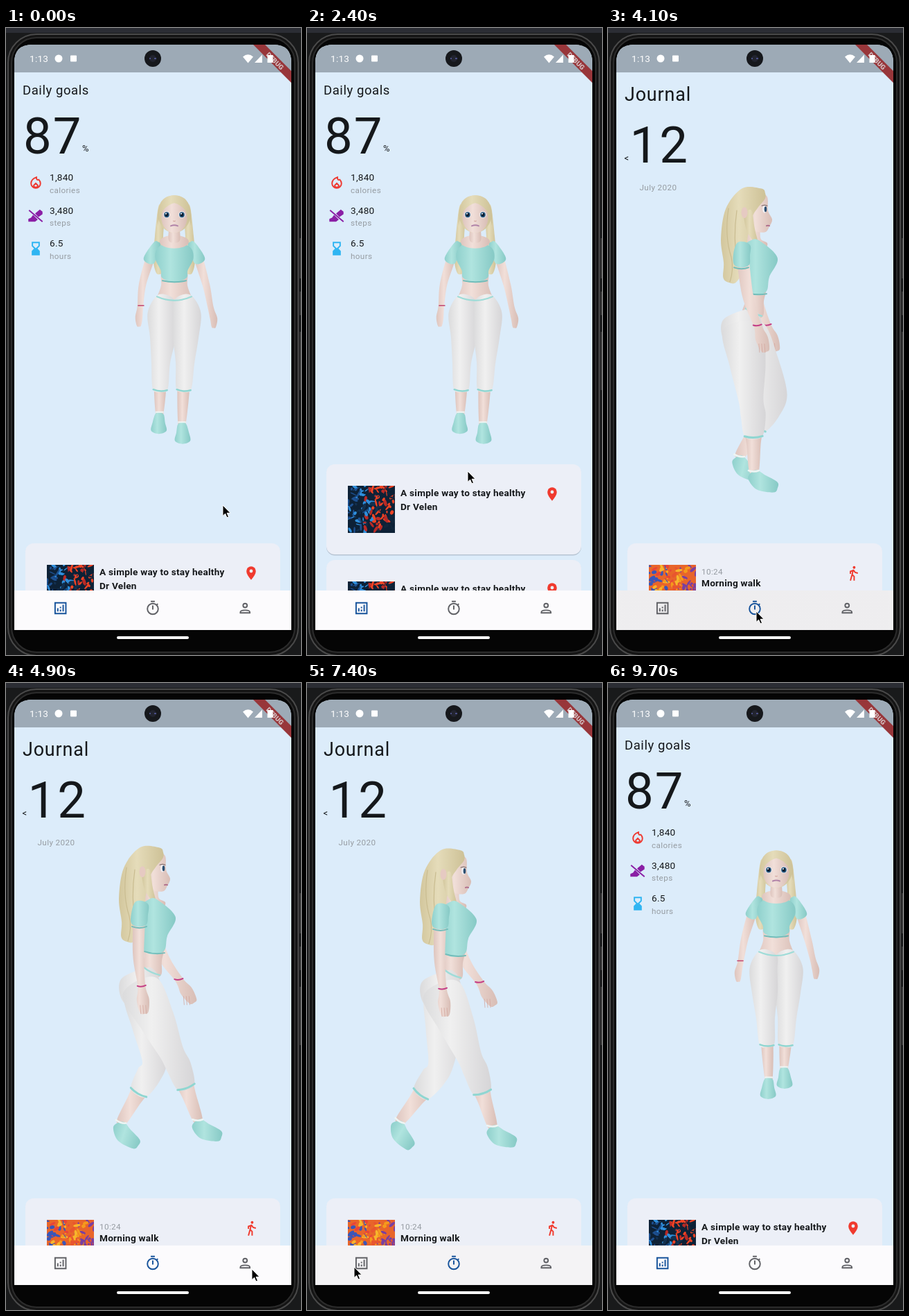
Recreate the animation shown at these times as an HTML page. Size 426 by 904 pixels, loop 9.8 s.

```html
<!DOCTYPE html>
<html lang="en">
<head>
<meta charset="utf-8">
<style>
html, body { margin: 0; width: 100%; height: 100%; overflow: hidden; background: #222429; }
svg { display: block; width: 100%; height: 100%; font-family: Roboto, sans-serif; fill: #15181b; }
.body { font-size: 13.62px; letter-spacing: .243px; }
.small { font-size: 11.68px; letter-spacing: .39px; fill: #969ca2; }
.bold { font-weight: 700; }
.unit { font-size: 13px; letter-spacing: .4px; }
.huge { font-size: 72.5px; letter-spacing: 2px; }
</style>
</head>
<body>
<svg id="stage" viewBox="0 0 426 904"></svg>
<script>
const TAU = Math.PI * 2, LOOP = 9800, STEP = 1200;
const $ = id => document.getElementById(id);
const clamp = v => Math.max(0, Math.min(1, v));
const ease = v => (v = clamp(v), v * v * (3 - 2 * v));
const mix = (a, b, k) => a + (b - a) * k;
const bothSides = draw => draw(-1) + draw(1);

// Icons on a 24 unit grid; paths are stroked unless they carry a fill.
const circle = (x, y, r, extra = '') => `<circle cx="${x}" cy="${y}" r="${r}" ${extra}/>`;
const path = (d, extra = '') => `<path d="${d}" ${extra}/>`;
const SOLID = 'fill="currentColor" stroke="none"';
const ICONS = {
  stats: path('M4 4h16v16H4zM8 12v5M12 10v2M12 14v3M16 7v10'),
  timer: circle(12, 13, 8) + path('M9 2h6M12 8v6M17.500 7.500l2-2'),
  person: circle(12, 8, 3) + path('M5 19v-1c0-4 14-4 14 0v1z'),
  pin: path('M12 22Q5 14 5 9a7 7 0 0 1 14 0Q19 14 12 22z', SOLID) + circle(12, 9, 2.5, 'fill="#eceff7" stroke="none"'),
  walk: circle(13.5, 3.5, 2, SOLID) + path('M8 13V9.500L12 8l-1.500 6 3 3v6M10.500 14L8 23M13 8l2 3 4 1'),
  fire: path('M13 4Q5 7 5 13a7 7 0 0 0 14 0q0-3-2.500-5.500Q13 9 13 4zM12 13l-3 3a3 3 0 0 0 6 0z'),
  shoe: path('M1 17v4h10l4-3-7-7-3 4zM11 9l5 5 6-4V6l-4-3z', SOLID) + path('M2 4l20 17'),
  glass: path('M7 3h10v5l-4 4 4 4v5H7v-5l4-4-4-4z') + path('M7 21v-5l5-4 5 4v5z', SOLID)
};
const icon = (name, x, y, color, id = name) =>
  `<g id="${id}" color="${color}" fill="none" stroke="currentColor" stroke-width="2" transform="translate(${x - 11.7} ${y - 11.7}) scale(.973)">${ICONS[name]}</g>`;
const text = (s, x, y, cls, extra = '') => `<text x="${x}" y="${y}" class="${cls}" ${extra}>${s}</text>`;
// Headings scale to one width, hanging from the same top edge.
const heading = (s, size) => text(s, 24, 76 + size * 1.09, '', `font-size="${size}" letter-spacing="${size / 32}"`);

// Abstract paint picture: colours run from left to right with some scatter.
function paint(base, colors, seed) {
  const rnd = () => (seed = seed * 16807 % 2147483647) / 2147483647;
  let out = `<rect width="68" height="68" fill="${base}"/>`;
  for (let i = 0; i < 150; i++) {
    const x = rnd() * 68, y = rnd() * 68, k = clamp(x / 68 + (rnd() - .5) * .5) * .999;
    out += `<ellipse cx="${x}" cy="${y}" rx="${1 + rnd() * 5}" ry="${.6 + rnd() * 2}" fill="${colors[k * colors.length | 0]}" transform="rotate(${rnd() * 180} ${x} ${y})"/>`;
  }
  return out;
}
const card = (y, photo, mark, lines) => `<g transform="translate(0 ${y})">
  <rect x="28" y="1.5" width="368" height="130" rx="12" fill="#9aa5b3" opacity=".55"/>
  <rect x="28" width="368" height="130" rx="12" fill="#eceff7"/>
  <g transform="translate(59 31)" clip-path="url(#photoClip)">${photo}</g>
  ${lines}${icon(mark, 354, 43, '#f03a2e')}</g>`;
const article = y => card(y, paint('#0d2136', ['#1d4f8f', '#2f8fdc', '#12304f', '#b92a26', '#ef4425', '#10263c'], 71), 'pin',
  text('A simple way to stay healthy', 135, 46, 'body bold') + text('Dr Velen', 135, 65.5, 'body bold'));
const stat = (row, name, color, value, label) => `<g transform="translate(0 ${215 + row * 47.5})">` +
  icon(name, 43, 8, color) + text(value, 63, 5, 'body') + text(label, 63, 22.5, 'small') + '</g>';
const gradient = (id, edge, mid, dark) => `<linearGradient id="${id}">
  <stop stop-color="${edge}"/><stop offset=".4" stop-color="${mid}"/><stop offset="1" stop-color="${dark}"/></linearGradient>`;
const bezel = (inset, radius, fill, stroke) => `<rect x="${inset}" y="${inset + 6}" width="${425 - 2 * inset}"
  height="${902 - 2 * inset}" rx="${radius}" fill="${fill}" stroke="${stroke}" stroke-width="2"/>`;

$('stage').innerHTML = `<defs>
  ${gradient('skin', '#dec5be', '#f1dfd9', '#d8bdb5')}
  ${gradient('teal', '#8fd0cc', '#b0e4df', '#86c9c5')}
  ${gradient('pants', '#dbdbdc', '#f0f0f0', '#d6d5d7')}
  ${gradient('hair', '#d2c69c', '#e5dcba', '#cdc196')}
  <radialGradient id="ink"><stop offset=".6"/><stop offset="1" stop-opacity="0"/></radialGradient>
  <clipPath id="screen"><path d="M12 868V50Q12 24 38 24H386Q412 24 412 50V868Z"/></clipPath>
  <clipPath id="above"><rect x="12" y="64" width="400" height="747"/></clipPath>
  <clipPath id="navClip"><rect x="12" y="811" width="400" height="57"/></clipPath>
  <clipPath id="photoClip"><rect width="68" height="68"/></clipPath>
  <clipPath id="round">${circle(212, 438, 180)}</clipPath>
</defs>
<rect width="426" height="904" fill="#191a1b"/>
<rect width="426" height="7" fill="#2b2d34"/>
<path d="M424 303h2v58h-2zM424 380h2v34h-2zM424 438h2v84h-2z" fill="#3b3b3b"/>
${bezel(3, 41, '#141414', '#4a4a4a')}${bezel(8, 36, '#050505', '#2c2c2c')}
<g clip-path="url(#screen)">
  <rect id="back" x="12" y="24" width="400" height="844"/>
  <g clip-path="url(#above)">
    <g id="home">${heading('Daily goals', 18.5)}
      ${text('87', 25, 181, 'huge')}${text('%', 110, 178, 'unit')}
      ${stat(0, 'fire', '#ee3a32', '1,840', 'calories')}
      ${stat(1, 'shoe', '#8a1fa5', '3,480', 'steps')}
      ${stat(2, 'glass', '#2fb5f2', '6.5', 'hours')}</g>
    <g id="journal">${heading('Journal', 26.9)}
      ${text('&lt;', 23.5, 192, 'unit')}${text('12', 31.5, 194, 'huge')}${text('July 2020', 45.5, 233.5, 'small')}
      ${card(743, paint('#e8652a', ['#3a56b8', '#e8443a', '#f7b52c', '#f59a1d', '#e8562f', '#7a3fa0'], 23), 'walk',
        text('10:24', 135, 44.5, 'small') + text('Morning walk', 135, 62, 'body bold'))}</g>
    <g id="profile">${heading('Profile', 30.8)}
      ${text('Vio', 24, 190, '', 'font-size="62.3" letter-spacing="2"')}${text('23 years old', 39.5, 226, 'small')}
      ${circle(212, 438, 180, 'fill="#dcecfa"')}</g>
    <g id="frame"><g id="figure"></g></g>
    <g id="list">${article(743)}${article(881)}</g>
  </g>
  <rect x="12" y="24" width="400" height="40" fill="#9daab6"/>
  <path d="M357 24H374L412 62V79Z" fill="#98363a"/>
  <text transform="translate(388.5 47.5) rotate(45)" y="3.5" text-anchor="middle" font-size="9.7" font-weight="900" fill="#d3bfc1">DEBUG</text>
  <g fill="#fff">${text('1:13', 34, 49, 'body', 'fill="#fff"')}
    ${circle(76, 44, 5.5)}<rect x="93" y="39.500" width="9" height="9" rx="1"/>
    <path d="M342 41.500Q349.500 35 357 41.500L349.500 50.500ZM359 50H370V38.500ZM377.500 39h8v11h-8z"/></g>
  <rect x="12" y="811" width="400" height="57" fill="#fcfbfd"/>
  <circle id="ripple" cy="840" fill="url(#ink)" clip-path="url(#navClip)"/>
  ${['stats', 'timer', 'person'].map((name, i) => icon(name, 78.7 + i * 133.3, 836.5, '', 'nav' + i)).join('')}
</g>
${circle(212, 44, 12, 'fill="#16181c"')}${circle(212, 44, 5, 'fill="#22242f"')}
<path d="M207 44h2M214 44h3" stroke="#4a4f86" stroke-width="2"/>
<rect x="160" y="877" width="104" height="4" rx="2" fill="#fff"/>
<path id="cursor" d="M0 0V15.500L3.600 12.200 6 17.800 8.500 16.700 6.100 11.300H11Z" fill="#000" stroke="#fff"/>`;

// Smooth closed outline through the points.
function blob(fill, p) {
  const n = p.length, at = i => p[(i + n) % n];
  const control = (i, s) => [0, 1].map(k => (at(i)[k] + s * (at(i + 1)[k] - at(i - 1)[k]) / 6).toFixed(1));
  return path(`M${p[0]}` + p.map((_, i) => `C${control(i, 1)} ${control(i + 1, -1)} ${at(i + 1)}`).join('') + 'Z', `fill="url(#${fill})"`);
}
// Tapered limb along [x, y, radius] joints.
function limb(fill, ...p) {
  const off = (i, along, across) => {
    const a = p[i - 1] || p[i], b = p[i + 1] || p[i], l = Math.hypot(b[0] - a[0], b[1] - a[1]);
    const u = (b[0] - a[0]) / l, v = (b[1] - a[1]) / l, [x, y, r] = p[i];
    return [x + r * (along * u - across * v), y + r * (along * v + across * u)];
  };
  return blob(fill, [...p.map((_, i) => off(i, 0, 1)), off(p.length - 1, .4, 0),
    ...p.map((_, i) => off(i, 0, -1)).reverse(), off(0, -.4, 0)]);
}
const oval = (x, y, rx, ry, fill) => `<ellipse cx="${x}" cy="${y}" rx="${rx}" ry="${ry}" fill="${fill}"/>`;
const line = (d, color, w) => path(d, `fill="none" stroke="${color}" stroke-width="${w}" stroke-linecap="round"`);
const shift = (y, s) => `<g transform="translate(0 ${y.toFixed(2)})">${s}</g>`;
const bob = ph => 5 * Math.cos(2 * TAU * (ph - .05));

function frontLeg(side, depth, footX, b) {
  const x = 243 + side * 18.5, y = 594 + 15 * depth, cx = mix(x, footX, .65), cy = 520 + b * .6;
  return limb('skin', [cx, cy - 8, 8.5], [footX, y - 30, 5.5]) +
    limb('teal', [footX, y - 30, 6], [footX + side, y - 18, 9], [footX + side, y - 6, 11]) +
    line(`M${footX - 5} ${y - 33}h10`, '#eef5f4', 2) +
    limb('pants', [243 + side * 12, 390 + b, 14], [x, 412 + b, 20], [x - side * 2, 446 + b, 18.5], [mix(x, cx, .6), 483, 13.5], [cx, cy, 10.8]) +
    line(`M${cx - 10} ${cy + 1}q10 4 20 1`, '#8fd6d1', 2.5);
}
function frontArm(side, handX, handY) {
  const at = (out, y, r) => [243 + side * out, y, r];
  return limb('skin', at(35, 332, 6), at(46, 370, 5.2), [mix(243 + side * 46, handX, .6), handY - 28, 4.2], [handX, handY - 12, 5.2], [handX, handY, 3]) +
    limb('teal', at(24, 310, 5), at(32, 325, 8), at(37, 336, 8));
}
const eye = x => oval(x, 269, 5, 5, '#efedf0') + oval(x, 269, 3.8, 4, '#28587f') + oval(x, 269, 2.2, 2.4, '#0b1a2b') + oval(x - 1, 267.5, 1, 1, '#fff');

function front(ph) {
  const c = Math.cos(TAU * ph), s = Math.sin(TAU * ph), b = bob(ph);
  const legs = [frontLeg(-1, c, 227 + 6 * s, b), frontLeg(1, -c, 254, b)];
  if (c > 0) legs.reverse();
  const lock = k => limb('hair', [243 + k * 18, 258, 5], [243 + k * 22, 300, 6], [243 + k * 23, 335, 7], [243 + k * 20, 352, 6]);
  const behind = bothSides(lock) + frontArm(-1, 190 - 4 * c, 429) + frontArm(1, 300, 428 - 6 * c) +
    line(`M${189 - 4 * c} 400h8`, '#c0436f', 1.6) +
    limb('skin', [243, 350, 18], [243, 371, 19], [243, 388, 25], [243, 396, 27]);
  const body = line('M218 387q25 11 50 0', '#9fdcd8', 2.2) +
    limb('teal', [243, 316, 23], [243, 332, 27.5], [243, 349, 19.5], [243, 360, 17.5]) +
    oval(243, 308, 21, 9.5, 'url(#skin)') + limb('skin', [243, 288, 7], [243, 306, 8]) +
    line('M226 364q17 4 34 0', '#72bdba', 2) +
    oval(243, 268, 23.5, 27, 'url(#hair)') + oval(243, 273, 18.5, 22, 'url(#skin)') +
    path('M219 285Q215 241 243 241Q271 241 267 285Q264 258 243 252Q222 258 219 285Z', 'fill="url(#hair)"') +
    bothSides(k => eye(243 + k * 11)) + line('M241.500 278q1.500 1 3 0', '#cf9f96', 1) + line('M238 285q5 -2 10 0', '#b183a8', 2);
  return shift(b, behind) + legs.join('') + shift(b, body);
}

// Stance slides back in a straight line, swing returns with a lift.
function sideLeg(ph, hipX, hipY) {
  ph -= Math.floor(ph);
  const u = clamp((ph - .6) / .4);
  const x = ph < .6 ? 285 - 268 * ph : mix(124, 285, (1 - Math.cos(Math.PI * u)) / 2);
  const y = 639 - 7 * ease((ph - .3) / .2) * (1 - u) - 18 * Math.sin(Math.PI * u);
  const turn = 30 * ease((ph - .3) / .25) * (1 - ease(u / .8));
  const dx = x - hipX, dy = y - hipY, d = Math.hypot(dx, dy);
  const bend = Math.sqrt(Math.max(50, 102 * 102 - d * d / 4));
  const kx = hipX + dx / 2 + dy / d * bend, ky = hipY + dy / 2 - dx / d * bend;
  const on = (k, r) => [mix(kx, x, k), mix(ky, y, k), r];
  const [cx, cy] = on(.5), a = Math.atan2(y - ky, x - kx) * 360 / TAU - 90;
  return limb('skin', on(.4, 12), on(.65, 10), on(1, 7)) +
    `<g transform="translate(${x} ${y}) rotate(${turn})">` +
    limb('teal', [-2, 5, 9], [10, 16, 12], [31, 23, 8]) + line('M-8 -1q8 3 15 0', '#eef5f4', 2.5) + '</g>' +
    limb('pants', [hipX, hipY, 29], [mix(hipX, kx, .5), mix(hipY, ky, .5), 26], [kx - 3, ky, 18], on(.22, 18), on(.5, 13.5)) +
    `<g transform="translate(${cx} ${cy}) rotate(${a})">${line('M-13 1q13 4 26 0', '#8fd6d1', 3)}</g>`;
}
function sideArm(x, y, deg, bend) {
  const step = ([px, py], len, a) => [px + len * Math.sin(a * TAU / 360), py + len * Math.cos(a * TAU / 360)];
  const e = step([x, y], 68, deg), w = step(e, 46, deg + bend), h = step(w, 20, deg + bend), tip = step(h, 18, deg + bend);
  return limb('skin', [x, y, 8], [...e, 8], [...w, 5.5], [...h, 9], [...tip, 6]) +
    line(`M${w[0] - 6} ${w[1]}q6 2 12 -1`, '#c43d86', 2) +
    [-4, 0, 4].map(k => line(`M${h[0] + k} ${h[1] + 8}l1 12`, '#d3a89f', .8)).join('');
}
function sideView(ph) {
  const c = Math.cos(TAU * ph), b = bob(ph);
  const waist = limb('skin', [214, 378, 14], [212, 398, 13], [209, 418, 15]) +
    limb('pants', [211, 416, 11], [196, 437, 32], [196, 458, 27]) + line('M199 409q10 8 23 11', '#9fdcd8', 2.5);
  const head = limb('skin', [211, 288, 8], [209, 312, 12], [222, 324, 12]) +
    blob('skin', [[200, 250], [228, 246], [231, 268], [237, 281], [233, 291], [227, 299], [212, 297], [198, 282]]) +
    limb('hair', [224, 244, 8], [205, 250, 18], [189, 272, 20], [182, 310, 19], [183, 345, 16], [176, 368, 10]) +
    limb('hair', [202, 270, 6], [206, 295, 6], [215, 315, 2]) +
    line('M174 265q-6 40 4 70q4 18 -2 36M186 268q-6 40 1 80', '#c9bc90', 1.2) +
    oval(197, 271, 4.5, 8, '#e6cac2') + oval(226, 266, 3, 5.5, '#efedf0') + oval(227.5, 266, 1.8, 4, '#2b4f72') +
    line('M222 261q4 -2 8 0', '#6d5a5d', 1) + line('M229 290q2 -1 4 0', '#b06f8c', 2);
  const top = limb('teal', [207, 316, 12], [218, 340, 27], [214, 362, 19], [214, 384, 15]) + line('M200 386q15 5 29 2', '#72bdba', 2) +
    sideArm(193, 322, 6 - 8 * c, 10 - 3 * c) + limb('teal', [196, 317, 10], [193, 332, 12], [193 - c, 346, 11]) + line('M182 350q11 4 21 0', '#72bdba', 2);
  return shift(b, sideArm(206, 322, 8 + 8 * c, 14 + 4 * c)) + sideLeg(ph + .5, 199, 444 + b) +
    shift(b, waist) + sideLeg(ph, 194, 439 + b) + shift(b, head + top);
}

// [start ms, page, walk phase at that moment]
const VISITS = [[0, 'home', .67], [3600, 'journal', .86], [5500, 'profile', .87], [6700, 'journal', .48], [7700, 'home', .5]];
const PAGES = ['home', 'journal', 'profile'];
// [leave ms, arrive ms, x, y]
const MOVES = [[0, 0, 313, 688], [900, 1300, 240, 753], [1300, 2000, 232, 639], [2600, 3200, 214, 841],
  [4200, 4800, 355, 845], [6100, 6600, 214, 842], [6800, 7300, 68, 842]];

function draw(t) {
  const [start, page, phase] = VISITS.findLast(v => v[0] <= t);
  const walk = phase + (t - start) / STEP, here = PAGES.indexOf(page), zoomed = page === 'profile';
  PAGES.forEach((p, i) => {
    $(p).style.display = i === here ? '' : 'none';
    $('nav' + i).setAttribute('color', i === here ? '#17539b' : '#606166');
  });
  $('back').setAttribute('fill', zoomed ? '#fdfcfe' : '#dcecfa');
  $('figure').innerHTML = page === 'journal' ? sideView(walk) : front(walk);
  $('figure').setAttribute('transform', zoomed ? 'translate(217.5 422) scale(1.32) translate(-242.5 -271)' : '');
  $('frame').setAttribute('clip-path', zoomed ? 'url(#round)' : 'none');
  $('list').style.display = page === 'home' ? '' : 'none';
  $('list').setAttribute('transform', `translate(0 ${start ? 0 : -114 * ease((t - 1300) / 700)})`);

  const age = start ? (t - start) / 1000 : 1, ripple = $('ripple');
  ripple.setAttribute('cx', 78.7 + here * 133.3);
  ripple.setAttribute('r', 40 + 560 * age);
  ripple.setAttribute('opacity', .055 * clamp(2 - 2 * age));

  let x = 0, y = 0;
  for (const [leave, arrive, toX, toY] of MOVES) {
    const k = arrive ? ease((t - leave) / (arrive - leave)) : 1;
    x = mix(x, toX, k);
    y = mix(y, toY, k);
  }
  $('cursor').setAttribute('transform', `translate(${x} ${y})`);
  $('cursor').style.display = t < 8800 ? '' : 'none';
}
let shown = -1;
function tick() {
  let t = Math.floor(performance.now() % LOOP / 100) * 100;
  if (t < 200) t = 0;
  if (t !== shown) draw(shown = t);
  requestAnimationFrame(tick);
}
tick();
</script>
</body>
</html>
```
